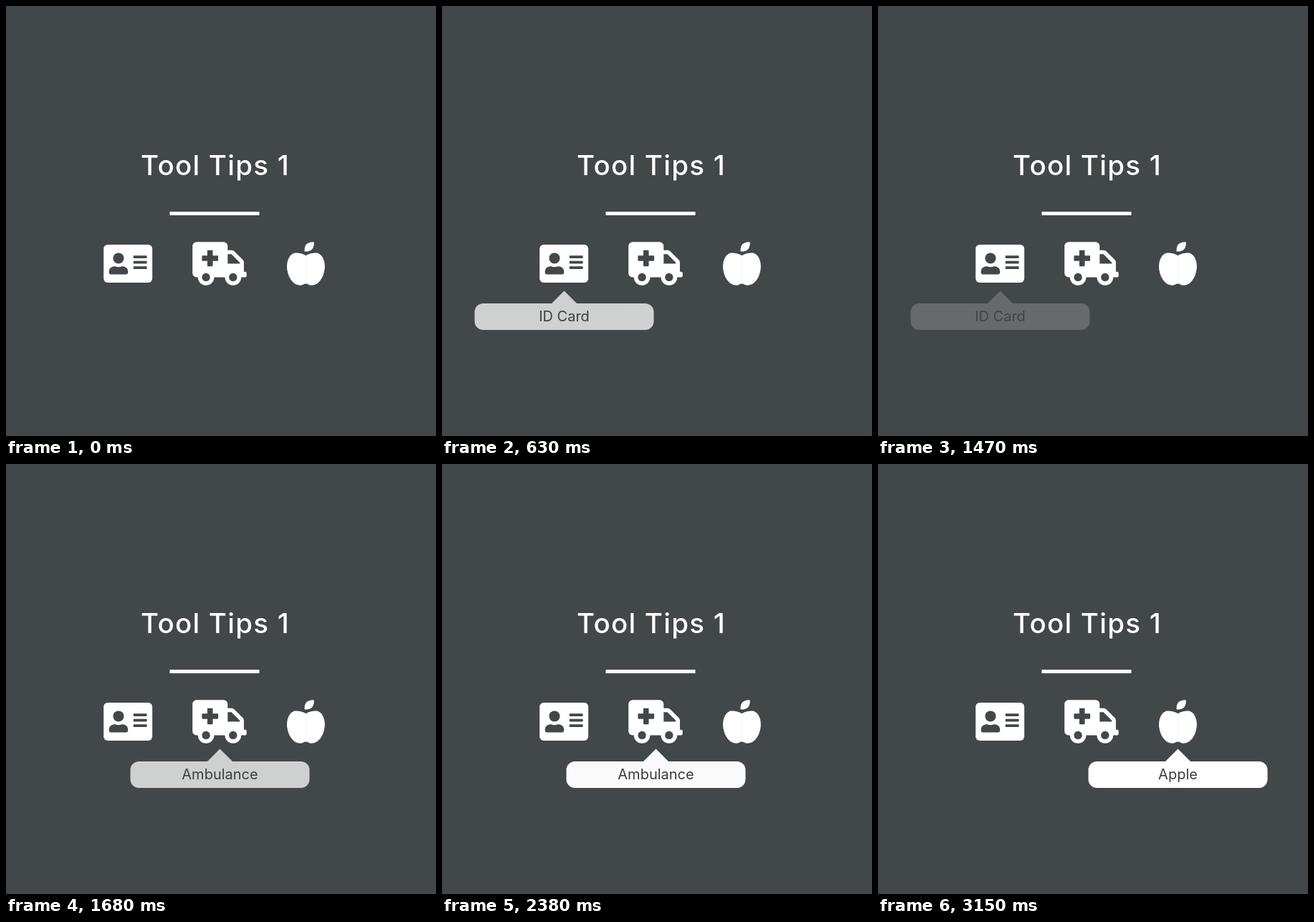
Recreate the animation shown at these times as an HTML page. Size 600 by 600 pixels, loop 3.22 s.

```html
<!DOCTYPE html>
<html lang="en">
<head>
<meta charset="utf-8">
<title>Tool tips</title>
<style>
  html, body { margin: 0; width: 100%; height: 100%; overflow: hidden; background: #424749; }
  svg { display: block; width: 100%; height: 100%; }
  text { font-family: Inter, Roboto, sans-serif; text-anchor: middle; }
  .title { font-size: 38.5px; font-weight: 500; letter-spacing: 1.25px; }
  .tip text { font-size: 20px; fill: #3a3e40; }
  .hole { fill: #424749; }
</style>
</head>
<body>
<svg id="stage" viewBox="0 0 600 600" fill="#fff">
  <rect class="hole" width="600" height="600"/>
  <text class="title" x="292" y="236">Tool Tips 1</text>
  <rect x="228.5" y="287" width="125" height="5"/>

  <!-- card -->
  <g transform="translate(136.2 329.3) scale(.118)">
    <rect y="32" width="576" height="448" rx="48"/>
    <g class="hole">
      <circle cx="176" cy="192" r="64"/>
      <path d="M288 364.8c0 10.6-10 19.2-22.4 19.2H86.4C74 384 64 375.4 64 364.8v-19.2c0-31.8 30.1-57.6 67.2-57.6h5c25 10.6 54.600 10.6 79.600 0h5c37.100 0 67.200 25.800 67.200 57.600z"/>
      <rect x="352" y="160" width="160" height="32" rx="8"/>
      <rect x="352" y="224" width="160" height="32" rx="8"/>
      <rect x="352" y="288" width="160" height="32" rx="8"/>
    </g>
  </g>

  <!-- ambulance -->
  <g transform="translate(260.2 329.3) scale(.118)">
    <rect width="416" height="416" rx="48"/>
    <path d="M368 96h92.100c12.700 0 24.900 5.100 33.900 14.100l99.900 99.900c9 9 14.100 21.200 14.100 33.900V352h16a16 16 0 0 1 16 16v32a16 16 0 0 1-16 16H368z"/>
    <circle cx="160" cy="416" r="96"/>
    <circle cx="480" cy="416" r="96"/>
    <g class="hole">
      <circle cx="160" cy="416" r="48"/>
      <circle cx="480" cy="416" r="48"/>
      <rect x="176" y="96" width="64" height="192" rx="8"/>
      <rect x="112" y="160" width="192" height="64" rx="8"/>
      <path d="M416 144h44.100l99.900 99.900V256H416z"/>
    </g>
  </g>

  <!-- apple -->
  <g transform="translate(392 329.3) scale(.118)">
    <path id="half" d="M222 160h2c16.650-9.330 36.960-17.330 60.930-24 27.980-7.330 49.960-9.670 65.940-7 25.970 4.670 47.270 18.670 63.920 42 14.650 20.670 24.640 46.670 29.960 78 4.670 28.670 4.320 57.330-1 86-7.990 47.330-23.970 87-47.940 119-28.640 38.670-64.590 58-107.870 58-10.660 0-22.300-3.330-34.960-10-8.660-5.330-18.310-8-28.970-8h-2z"/>
    <use href="#half" transform="matrix(-1 0 0 1 448 0)"/>
    <path d="M296 88c-9.300 8.700-21.700 15-37 19-15.600 4.900-32.300 6.100-50 4-1.300-9.300-1.300-20 0-32 2.700-24 10.300-42.300 23-55 9.300-8.700 21.700-15 37-19 10.700-3.300 22.300-5 35-5l15 1 1 15c0 12.700-1.700 24.300-5 35-4 15.300-10.300 27.700-19 37z"/>
  </g>
</svg>
<script>
const LOOP = 3220, STEP = 70, FADE = 380;

const tips = [
  { label: "ID Card",   x: 170.5, show: 459,  hide: 1276 },
  { label: "Ambulance", x: 298.5, show: 1509, hide: 2366 },
  { label: "Apple",     x: 418.5, show: 2496, hide: Infinity }
];

const stage = document.getElementById("stage");

for (const tip of tips) {
  tip.node = document.createElementNS("http://www.w3.org/2000/svg", "g");
  tip.node.setAttribute("class", "tip");
  tip.node.setAttribute("transform", `translate(${tip.x} 0)`);
  tip.node.innerHTML = `<path d="M0 397.500L18 415.500H-18z"/>
    <rect x="-125" y="415" width="250" height="37" rx="12"/>
    <text y="440">${tip.label}</text>`;
  stage.append(tip.node);
}

// cubic-bezier(.25, .1, .25, 1), solved for x by bisection
function ease(x) {
  if (x <= 0) return 0;
  if (x >= 1) return 1;
  const curve = (a, b, u) => 3 * a * u * (1 - u) ** 2 + 3 * b * u * u * (1 - u) + u ** 3;
  let low = 0, high = 1;
  for (let i = 0; i < 24; i++) {
    const mid = (low + high) / 2;
    if (curve(.25, .25, mid) < x) low = mid; else high = mid;
  }
  return curve(.1, 1, low);
}

function draw(ms) {
  const t = Math.floor((ms % LOOP) / STEP) * STEP;
  for (const { node, show, hide } of tips) {
    node.setAttribute("opacity", ease((t - show) / FADE) - ease((t - hide) / FADE));
  }
}

const start = performance.now();
function tick() {
  draw(performance.now() - start);
  requestAnimationFrame(tick);
}
tick();
</script>
</body>
</html>
```
